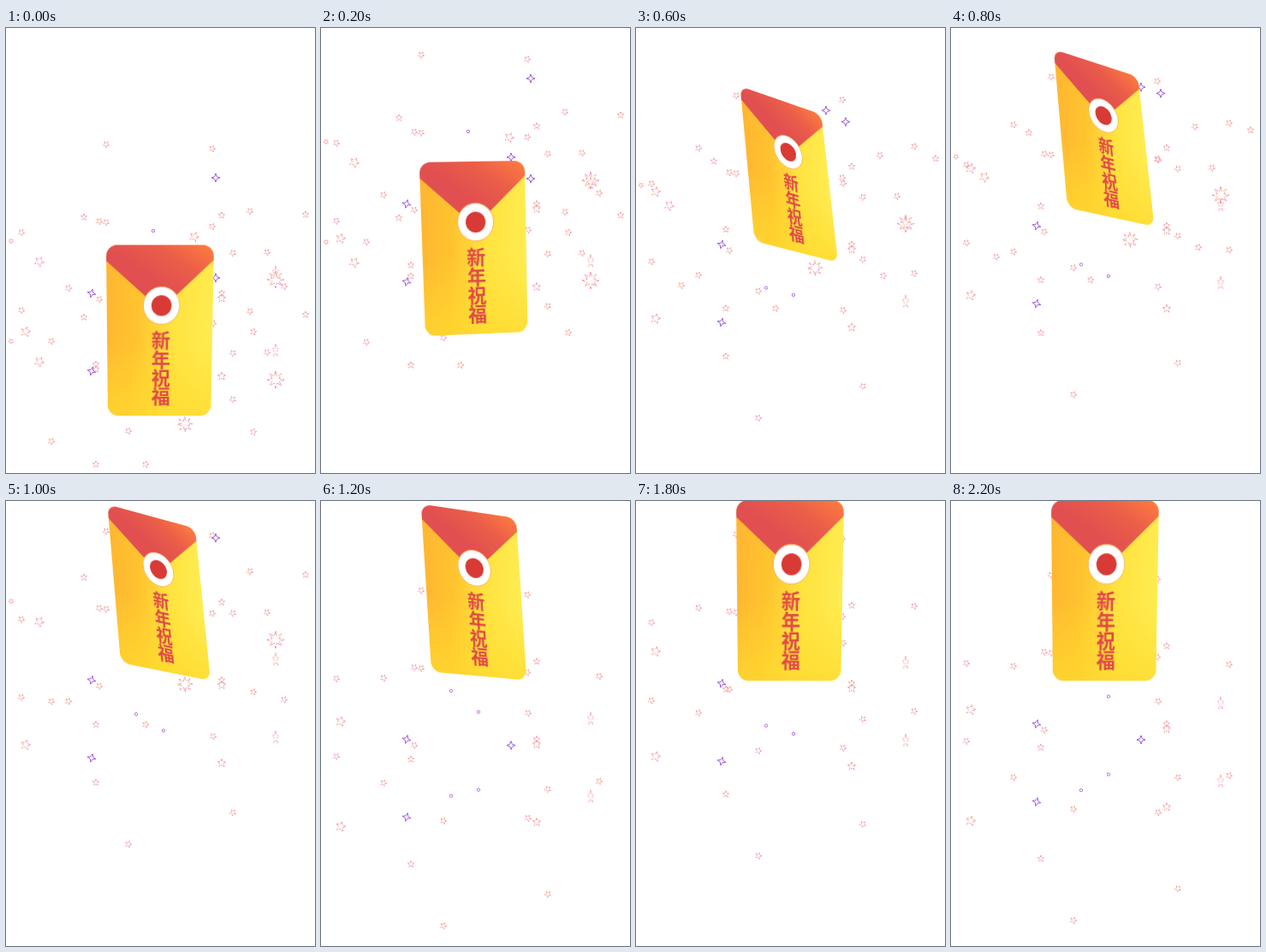
An HTML page with a canvas for the animation above (2.4 s loop, 361x520 px).

```html
<!DOCTYPE html>
<html lang="zh">
<head>
<meta charset="utf-8">
<title>New year envelope</title>
<style>
  html, body { margin: 0; width: 100%; height: 100%; overflow: hidden; background: #fff; }
  #stage { position: relative; width: 361px; height: 520px; overflow: hidden; }
  canvas { position: absolute; left: 0; top: 0; }
  #card { position: absolute; left: 0; top: 0; width: 126px; height: 200px; transform-origin: 0 0; }
  #card text {
    font: 900 23px "Noto Sans CJK SC", "Noto Sans CJK", "Noto Sans CJK JP", sans-serif;
    fill: #e0494a; text-anchor: middle;
  }
</style>
</head>
<body>
<div id="stage">
  <canvas id="sky" width="361" height="520"></canvas>
  <svg id="card" viewBox="0 0 126 200">
    <defs>
      <linearGradient id="paper" x1="0" y1=".3" x2="1" y2=".42">
        <stop offset="0" stop-color="#ffb731"/>
        <stop offset=".3" stop-color="#ffc32f"/>
        <stop offset=".62" stop-color="#ffe23f"/>
        <stop offset="1" stop-color="#ffec50"/>
      </linearGradient>
      <linearGradient id="foot" x1="0" y1="0" x2="0" y2="1">
        <stop offset=".55" stop-color="#ffdc30" stop-opacity="0"/>
        <stop offset="1" stop-color="#ffd92e" stop-opacity=".75"/>
      </linearGradient>
      <linearGradient id="flap" x1=".3" y1=".6" x2="1" y2="0">
        <stop offset=".15" stop-color="#e14f50"/>
        <stop offset=".55" stop-color="#ea5d49"/>
        <stop offset="1" stop-color="#ff7d3f"/>
      </linearGradient>
      <clipPath id="edge"><rect width="126" height="200" rx="13"/></clipPath>
    </defs>
    <g clip-path="url(#edge)">
      <rect width="126" height="200" fill="url(#paper)"/>
      <rect width="126" height="200" fill="url(#foot)"/>
      <path d="M0 0H126V17L64 74L0 18Z" fill="url(#flap)"/>
    </g>
    <circle cx="65" cy="69" r="21.7" fill="#fff" stroke="#f8b45c" stroke-width="1"/>
    <circle cx="65" cy="69" r="12" fill="#d93a35"/>
    <text x="64.500" y="118.500">新</text>
    <text x="64.500" y="141">年</text>
    <text x="64.500" y="163">祝</text>
    <text x="64.500" y="185.500">福</text>
  </svg>
</div>
<script>
const STEP = 200, STEPS = 12;
const card = document.getElementById('card');
const ctx = document.getElementById('sky').getContext('2d');

// Card corners by step: top left, top right, bottom right, bottom left
const poses = {
  0: [117, 253.5, 243, 253.5, 239.3, 453, 119, 453],
  1: [114.7, 157, 238, 155, 241.5, 355, 122, 360],
  3: [121.5, 68, 216.5, 101, 236, 274, 138.5, 249],
  4: [120, 25, 218.5, 57, 237.5, 232, 136, 210],
  5: [118.5, 4, 221, 32, 239, 210, 134, 189],
  7: [115, 3, 235, 8, 241.5, 209, 124, 210],
  9: [117, -1, 243, -1, 239.3, 210, 119, 210]
};

// Each particle: x, y, size, kind
const risers = [
  [245, 175, 5, 'gem'], [91, 221], [172, 237, 2, 'ring'], [285, 214], [350, 218],
  [6, 249, 3], [220, 244, 6], [265, 263], [305, 262], [39, 273, 6], [315, 294, 10],
  [53, 366], [289, 355], [163, 393], [105, 393], [209, 346, 9]
];
const pairs = [
  [117, 136], [241, 141], [109, 226], [252, 219], [252, 316, 5], [18, 239],
  [100, 310, 5, 'gem'], [315, 286, 8, 'tall'], [184, 278, 2, 'ring']
];
const drifters = [
  [143, 0], [265, -37], [105, -72], [242, -126], [23, -116, 6], [73, -167],
  [325, -169], [222, -211, 5, 'gem'], [152, -152, 2, 'ring']
];

function pose(n) {
  if (n >= 9) return poses[9];
  if (poses[n]) return poses[n];
  return poses[n - 1].map((v, i) => (v + poses[n + 1][i]) / 2);
}

// Maps the flat card onto four corners
function project([x0, y0, x1, y1, x2, y2, x3, y3], w, h) {
  const ax = x1 - x2, ay = y1 - y2, bx = x3 - x2, by = y3 - y2;
  const sx = x0 - x1 + x2 - x3, sy = y0 - y1 + y2 - y3;
  const den = ax * by - bx * ay;
  const g = (sx * by - bx * sy) / den, k = (ax * sy - sx * ay) / den;
  const m = [
    (x1 - x0 + g * x1) / w, (y1 - y0 + g * y1) / w, 0, g / w,
    (x3 - x0 + k * x3) / h, (y3 - y0 + k * y3) / h, 0, k / h,
    0, 0, 1, 0,
    x0, y0, 0, 1
  ];
  return `matrix3d(${m.map(v => v.toFixed(7)).join()})`;
}

function starPath(points, r, inner, turn) {
  ctx.beginPath();
  for (let i = 0; i < points * 2; i++) {
    const a = turn + i * Math.PI / points, d = i % 2 ? r * inner : r;
    ctx.lineTo(Math.sin(a) * d, -Math.cos(a) * d);
  }
  ctx.closePath();
}

function particle([x, , size = 4, kind = 'spark'], y) {
  ctx.save();
  ctx.translate(x, y);
  ctx.lineWidth = 0.75;
  if (kind === 'ring') {
    ctx.strokeStyle = '#a445dc';
    ctx.beginPath();
    ctx.arc(0, 0, size - 0.3, 0, 7);
  } else if (kind === 'gem') {
    ctx.strokeStyle = '#7d2ad8';
    starPath(4, size, 0.38, x < 150 ? 0.25 : 0);
  } else {
    const ink = ctx.createLinearGradient(-size, -size, size, size);
    ink.addColorStop(0, '#ef45cf');
    ink.addColorStop(0.45, '#f5a06a');
    ink.addColorStop(1, '#e04fd8');
    ctx.strokeStyle = ink;
    ctx.setLineDash([size * 0.6, size * 0.2]);
    if (kind === 'tall') ctx.scale(0.5, 1);
    starPath(size > 7 && kind !== 'tall' ? 8 : 5, size, 0.42, x % 7 / 8);
  }
  ctx.stroke();
  ctx.restore();
}

function drawRisers(n) {
  if (n > 5) return;
  const shift = n ? -116 - 33.2 * (n - 1) : 0;
  for (const p of risers) {
    if (n < 2) particle(p, p[1] + shift);
    particle(p, p[1] + 117 + shift);
  }
}

function drawPairs(n) {
  let shift = n ? -104.5 - 21.8 * (n - 1) : 0;
  while (shift < -110) shift += 91;
  for (const p of pairs) {
    particle(p, p[1] + shift);
    particle(p, p[1] + 91 + shift);
  }
}

function drawDrifters(n) {
  const wave = (first, last, y) => {
    if (n < first || n > last) return;
    for (const p of drifters) particle(p, y + p[1] - 27.3 * (n - first));
  };
  wave(0, 0, 471);
  wave(1, 4, 362);
  wave(2, 9, 483);
  wave(6, 11, 496.5);
  wave(11, 11, 490);
}

let shown = -1;
function frame() {
  const n = Math.floor(performance.now() / STEP) % STEPS;
  if (n !== shown) {
    shown = n;
    ctx.clearRect(0, 0, 361, 520);
    drawRisers(n);
    drawPairs(n);
    drawDrifters(n);
    card.style.transform = project(pose(n), 126, 200);
  }
  requestAnimationFrame(frame);
}
frame();
</script>
</body>
</html>
```
